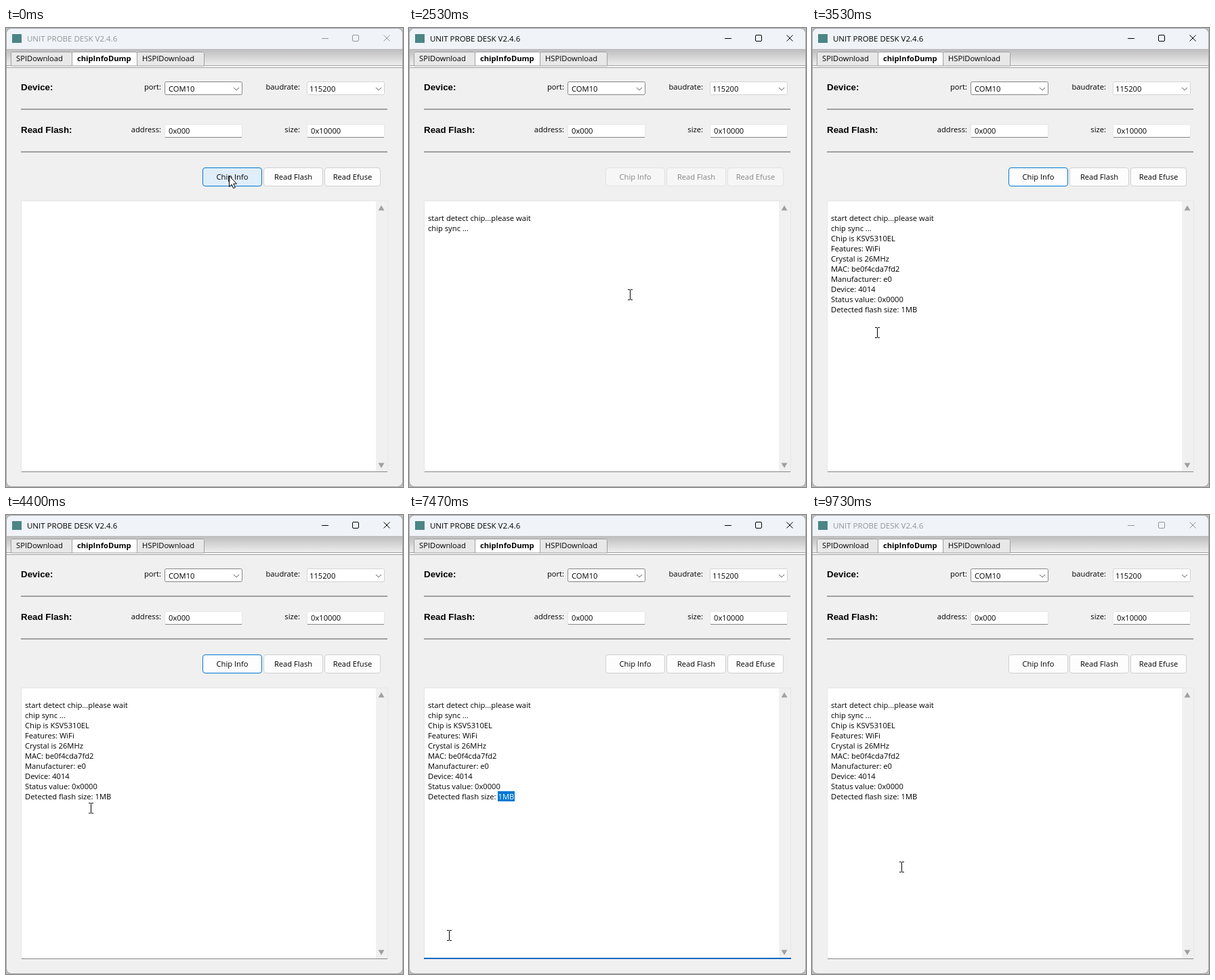
An HTML page with a canvas for the animation above (9800 ms loop, 586 px wide and 678 px high).

```html
<!DOCTYPE html>
<html lang="en">
<head>
<meta charset="utf-8">
<title>Device panel</title>
<style>
  html, body { margin: 0; width: 100%; height: 100%; overflow: hidden; background: #f0f0f0; }
  canvas { display: block; }
</style>
</head>
<body>
<canvas id="stage" width="586" height="678"></canvas>
<script>
const canvas = document.getElementById('stage');
const ctx = canvas.getContext('2d');
const { width: W, height: H } = canvas;
const LOOP = 9800, TICK = 1000 / 15;

const UI = '11.2px "Open Sans", sans-serif';
const TITLE = '11.5px "Open Sans", sans-serif';
const HEADING = 'bold 13.33px "Liberation Sans", Arial, sans-serif';
const FACE = '#f0f0f0', BORDER = '#a0a0a0', DARK = '#868686', ACCENT = '#0078d4';

const LOG = [
  'start detect chip...please wait', 'chip sync ...', 'Chip is KSV5310EL',
  'Features: WiFi', 'Crystal is 26MHz', 'MAC: be0f4cda7fd2', 'Manufacturer: e0',
  'Device: 4014', 'Status value: 0x0000', 'Detected flash size: 1MB'
];
const LOG_X = 28, LOG_BASELINE = 285, LOG_STEP = 15;
const logBox = { x: 23, y: 256, w: 540, h: 399, bar: 17 };

// What happens when, in ms.
const PRESS = 1470, START = 1600, FOUND = 2670, DONE = 3130, FOCUS = 4670;
const SELECT = 5070, DESELECT = 5400, RESELECT = 5870, CLICK = 8330, BLUR = 9270;
const BLINK = 530;

// The pointer rests between moves: [start, end, x, y].
const HOME = [330, 218];
const MOVES = [
  [2070, 2270, 326, 394], [2530, 2870, 200, 582], [3000, 3530, 96, 450],
  [4000, 4870, 161, 412], [5000, 5130, 138, 412], [5330, 5470, 159, 412],
  [5530, 5930, 138, 415], [6200, 6470, 157, 477], [7130, 7470, 59, 621],
  [7470, 7730, 41, 690], [7930, 8330, 143, 560], [8470, 8670, 49, 663],
  [8670, 8800, 38, 690], [9530, 9730, 132, 520]
];

const between = (now, from, to) => now >= from && now < to;
const smooth = k => k * k * (3 - 2 * k);

function pointerAt(now) {
  let [x, y] = HOME;
  for (const [from, to, toX, toY] of MOVES) {
    const k = smooth(Math.min(1, Math.max(0, (now - from) / (to - from))));
    x += (toX - x) * k;
    y += (toY - y) * k;
  }
  return [Math.round(x), Math.round(y)];
}

function rect(x, y, w, h, color) {
  ctx.fillStyle = color;
  ctx.fillRect(x, y, w, h);
}

function text(str, x, y, color = '#000', font = UI, align = 'left') {
  ctx.font = font;
  ctx.textAlign = align;
  ctx.fillStyle = color;
  ctx.fillText(str, x, y);
}

function shape(points, fill, stroke) {
  ctx.beginPath();
  points.forEach(([x, y]) => ctx.lineTo(x, y));
  if (fill) {
    ctx.closePath();
    ctx.fillStyle = fill;
    ctx.fill();
  }
  if (stroke) {
    ctx.strokeStyle = stroke;
    ctx.lineWidth = 1;
    ctx.stroke();
  }
}

function box(x, y, w, h, radius, fill, border) {
  ctx.beginPath();
  ctx.roundRect(x + .5, y + .5, w - 1, h - 1, radius);
  if (fill) {
    ctx.fillStyle = fill;
    ctx.fill();
  }
  ctx.strokeStyle = border;
  ctx.lineWidth = 1;
  ctx.stroke();
}

function titleBar(active) {
  const ink = active ? '#000' : '#949494';
  rect(0, 0, W, 31, '#f0f4f9');
  rect(9, 9, 14, 13, '#4c8585');
  text('UNIT PROBE DESK V2.4.6', 31, 20, ink, TITLE);
  shape([[466, 15.5], [476, 15.5]], null, ink);
  box(511, 10, 10, 10, 1.5, null, ink);
  shape([[557.5, 10.5], [566.5, 19.5]], null, ink);
  shape([[566.5, 10.5], [557.5, 19.5]], null, ink);
}

function tab(label, x, right, active) {
  const l = x + .5, r = right - .5, top = 35.5;
  shape([[l, 56], [l, top + 2], [l + 2, top], [r - 2, top], [r, top + 2], [r, 56]],
    active ? '#fff' : '#e8e8e8', BORDER);
  text(label, x + 8, 49, '#000', active ? 'bold ' + UI : UI);
}

function tabs() {
  const shade = ctx.createLinearGradient(0, 31, 0, 55);
  shade.addColorStop(0, '#bcbcbc');
  shade.addColorStop(1, '#eeeeee');
  rect(0, 31, W, 24, shade);
  rect(0, 55, W, 4, BORDER);
  rect(0, 56, W, 2, '#fafafa');
  tab('SPIDownload', 7, 98, false);
  tab('HSPIDownload', 193, 293, false);
  tab('chipInfoDump', 97, 194, true);
}

function combo(value, x, y, textX, border) {
  box(x, y, 115, 20, 2, '#fff', border);
  text(value, textX, y + 15);
  const cx = x + 106, cy = y + 11;
  shape([[cx - 4, cy - 2], [cx, cy + 2], [cx + 4, cy - 2]], null, '#606060');
}

function field(value, x, y) {
  box(x, y, 115, 20, 2, '#fff', '#e6e6e6');
  rect(x + 1, y + 19, 113, 1, DARK);
  text(value, x + 6, y + 14);
}

function formRow(heading, y, labels) {
  text(heading, 22, y + 13, '#000', HEADING);
  labels.forEach((label, i) => text(label, 229 + i * 205, y + 12, '#000', UI, 'right'));
  rect(22, y + 40, 541, 2, BORDER);
}

function form() {
  formRow('Device:', 79, ['port:', 'baudrate:']);
  formRow('Read Flash:', 142, ['address:', 'size:']);
  combo('COM10', 234, 79, 240, DARK);
  combo('115200', 444, 79, 448, '#d4d4d4');
  field('0x000', 234, 142);
  field('0x10000', 444, 142);
}

const BUTTON = {
  normal: ['#fdfdfd', '#d0d0d0', '#000'],
  focus: ['#fdfdfd', ACCENT, '#000'],
  hover: ['#e0eef9', ACCENT, '#000'],
  pressed: ['#cce4f7', '#005499', '#000'],
  disabled: ['#f6f6f6', '#e2e2e2', '#868686']
};

function button(label, x, w, state) {
  const [fill, border, ink] = BUTTON[state];
  box(x, 206, w, 28, 3.5, fill, border);
  text(label, x + w / 2, 224, ink, UI, 'center');
}

function buttons(now) {
  const rest = between(now, START, DONE) ? 'disabled' : 'normal';
  const first = now < PRESS ? 'hover'
    : now < START ? 'pressed'
    : between(now, DONE, FOCUS) ? 'focus' : rest;
  button('Chip Info', 290, 88, first);
  button('Read Flash', 380, 88, rest);
  button('Read Efuse', 470, 83, rest);
}

function scrollArrow(x, y, dir) {
  shape([[x - 4.5, y + 3.5 * dir], [x, y - 4 * dir], [x + 4.5, y + 3.5 * dir]], BORDER);
}

function caret(now, since, x, y) {
  if (Math.floor((now - since) / BLINK) % 2 === 0) rect(x, y, 1, 15, '#000');
}

function logArea(now) {
  const { x, y, w, h, bar } = logBox;
  rect(x - 1, y - 1, w + 2, h + 2, '#e6e6e6');
  rect(x, y, w, h, '#fff');
  rect(x + w - bar, y, bar, h, FACE);
  scrollArrow(x + w - 9, y + 10, 1);
  scrollArrow(x + w - 9, y + h - 9, -1);
  if (between(now, FOCUS, BLUR)) rect(x - 1, y + h - 1, w + 2, 2, '#0067c0');
  else rect(x, y + h, w, 1, DARK);

  const count = now < START ? 0 : now < FOUND ? 2 : now < DONE ? 6 : LOG.length;
  const baseline = i => LOG_BASELINE + i * LOG_STEP;
  LOG.slice(0, count).forEach((str, i) => text(str, LOG_X, baseline(i)));

  const last = LOG.length - 1, top = baseline(last) - 12;
  if (between(now, SELECT, DESELECT) || between(now, RESELECT, CLICK)) {
    ctx.save();
    ctx.beginPath();
    ctx.rect(131, top, 25, LOG_STEP);
    ctx.clip();
    rect(131, top, 25, LOG_STEP, ACCENT);
    text(LOG[last], LOG_X, baseline(last), '#fff');
    ctx.restore();
  } else if (between(now, FOCUS, RESELECT)) {
    caret(now, now < SELECT ? FOCUS : DESELECT, 155, top);
  } else if (between(now, CLICK, BLUR)) {
    caret(now, CLICK, 137, top);
  }
}

function textPointer(x, y) {
  rect(x, y - 7, 1, 14, '#000');
  for (const edge of [y - 8, y + 7]) {
    rect(x - 3, edge, 3, 1, '#000');
    rect(x + 1, edge, 3, 1, '#000');
  }
}

function arrowPointer(x, y) {
  const outline = [[0, 0], [0, 16], [3.7, 12.6], [6.2, 18.2], [8.8, 17], [6.3, 11.6], [11, 11.6]];
  shape(outline.map(([dx, dy]) => [x + dx - .5, y + dy + .5]), '#fff', '#000');
}

function pointer(x, y) {
  const { x: left, y: top, w, h, bar } = logBox;
  const overText = x > left && x < left + w - bar && y > top && y < top + h;
  (overText ? textPointer : arrowPointer)(x, y);
}

function draw(now) {
  rect(0, 0, W, H, '#bdbdbd');
  ctx.save();
  ctx.beginPath();
  ctx.roundRect(1, 1, W - 2, H - 2, 7);
  ctx.clip();
  rect(0, 0, W, H, FACE);
  titleBar(between(now, PRESS, BLUR));
  tabs();
  form();
  buttons(now);
  logArea(now);
  ctx.restore();
  box(0, 0, W, H, 7, null, '#a6a6a6');
  pointer(...pointerAt(now));
}

const start = performance.now();
function loop() {
  const time = (performance.now() - start) % LOOP;
  // Hold each picture for one tick, like a 15 Hz screen capture.
  draw((Math.floor((time + 4) / TICK) * TICK + 4) % LOOP);
  requestAnimationFrame(loop);
}
loop();
</script>
</body>
</html>
```
